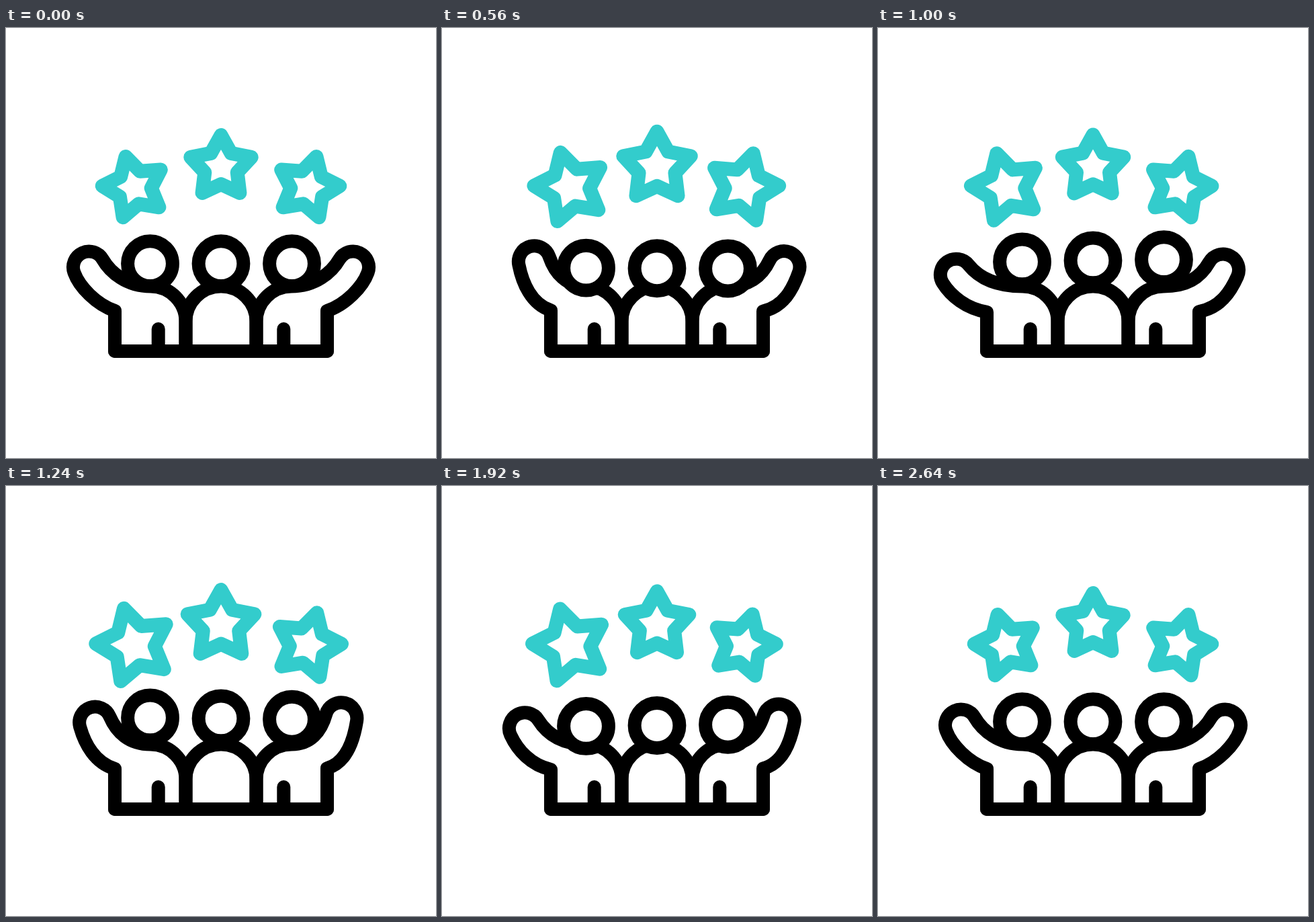
Animation of 640x640 px, one loop 3 s. Source, as an HTML page:

```html
<!DOCTYPE html>
<html>
<head>
<meta charset="utf-8">
<style>
  html, body { margin: 0; height: 100%; overflow: hidden; background: #fff; }
  svg { display: block; width: 100%; height: 100%; }
  path, circle { fill: none; stroke: #000; stroke-width: 20; stroke-linecap: round; stroke-linejoin: round; }
  circle { fill: #fff; }
  .star { stroke: #3cc; stroke-width: 21; }
</style>
</head>
<body>
<svg viewBox="0 0 640 640">
  <path class="star"/><path class="star"/><path class="star"/>
  <path d="M162 481H478M226.7 448V481M413.3 448V481M267.5 481V437A52.5 52.5 0 0 1 372.5 437V481"/>
  <path class="side"/>
  <path class="side" transform="matrix(-1 0 0 1 640 0)"/>
  <circle cx="214.5" r="33.4"/><circle cx="320" r="33.4"/><circle cx="425.5" r="33.4"/>
</svg>
<script>
const LOOP = 3000, STEP = 40, SWING = 400;
const stars = document.querySelectorAll('.star');
const heads = document.querySelectorAll('circle');
const sides = document.querySelectorAll('.side');

const rad = deg => deg * Math.PI / 180;
const smooth = u => u * u * (3 - 2 * u);
const mix = (a, b, u) => a + (b - a) * u;
const mixPose = (a, b, u) => a.map((v, i) => mix(v, b[i], u));

// Eased position between keyframes; blend joins two neighbouring values.
function track(t, times, values, blend = mix) {
  const last = times.length - 1;
  if (t <= times[0]) return values[0];
  for (let i = 0; i < last; i++) {
    if (t < times[i + 1]) {
      return blend(values[i], values[i + 1], smooth((t - times[i]) / (times[i + 1] - times[i])));
    }
  }
  return values[last];
}

// Stars: centre, tilt, extra size at the peak, delay
const starSpecs = [
  [190.7, 237.2, -15.5, 0.205, 0],
  [320, 207, 0, 0.115, 120],
  [449.3, 237.2, 15.5, 0.115, 240]
];
function starPath(x, y, tilt, scale) {
  const points = [];
  for (let i = 0; i < 10; i++) {
    const r = (i % 2 ? 25.5 : 47.5) * scale, a = rad(tilt - 90 + i * 36);
    points.push((x + r * Math.cos(a)).toFixed(2) + ' ' + (y + r * Math.sin(a)).toFixed(2));
  }
  return 'M' + points.join('L') + 'Z';
}

// Arm pose: hand x, y, lower and upper hand angle, lower and upper handle length,
// armpit handle x, y, armpit y, shoulder handle x
const rest = [123.5, 356, 160, -30, 23, 23, 134, 411, 421, 180];
const up = [142, 345, 172, -15, 29, 27, 132.5, 411, 420, 187];
const down = [111, 375, 140, -45, 23, 29, 130, 422, 424, 175];
const HAND = 23.5;
function sidePath([x, y, low, high, lowLen, highLen, pitX, pitY, pit, shoulder]) {
  const at = (deg, len) => {
    const c = Math.cos(rad(deg)), s = Math.sin(rad(deg));
    return [x + HAND * c + len * s, y + HAND * s - len * c];
  };
  return `M162 481V${pit}C${pitX} ${pitY} ${at(low, lowLen)} ${at(low, 0)}` +
    `A${HAND} ${HAND} 0 0 1 ${at(high, 0)}` +
    `C${at(high, -highLen)} ${shoulder} 384.5 215 384.5A52.5 52.5 0 0 1 267.5 437V481`;
}

const armTimes = [0, 1, 2, 3, 4, 5, 6].map(i => i * SWING);
const armPoses = (raise, drop) => {
  const u = mixPose(rest, up, raise), d = mixPose(rest, down, drop);
  return [rest, u, d, u, d, u, rest];
};
const arms = [
  { delay: 160, poses: armPoses(0.75, 0.62) },
  { delay: 0, poses: armPoses(1, 1) }
];

const headTimes = [0, 560, 1040, 1720, 2200];
const headY = [350.7, 358, 344.4, 358, 350.7];

function draw(t) {
  starSpecs.forEach(([x, y, tilt, grow, delay], i) => {
    const s = track(t - delay, armTimes, [0, 1, 0, 1, 0, 1, 0]);
    stars[i].setAttribute('d', starPath(x, y, tilt, 1 + grow * s));
  });
  heads.forEach((head, i) => head.setAttribute('cy', track(t - (2 - i) * 60, headTimes, headY)));
  arms.forEach(({ delay, poses }, i) =>
    sides[i].setAttribute('d', sidePath(track(t - delay, armTimes, poses, mixPose))));
}

const start = performance.now();
function tick() {
  const t = (performance.now() - start) % LOOP;
  draw(Math.floor(t / STEP) * STEP);
  requestAnimationFrame(tick);
}
tick();
</script>
</body>
</html>
```
